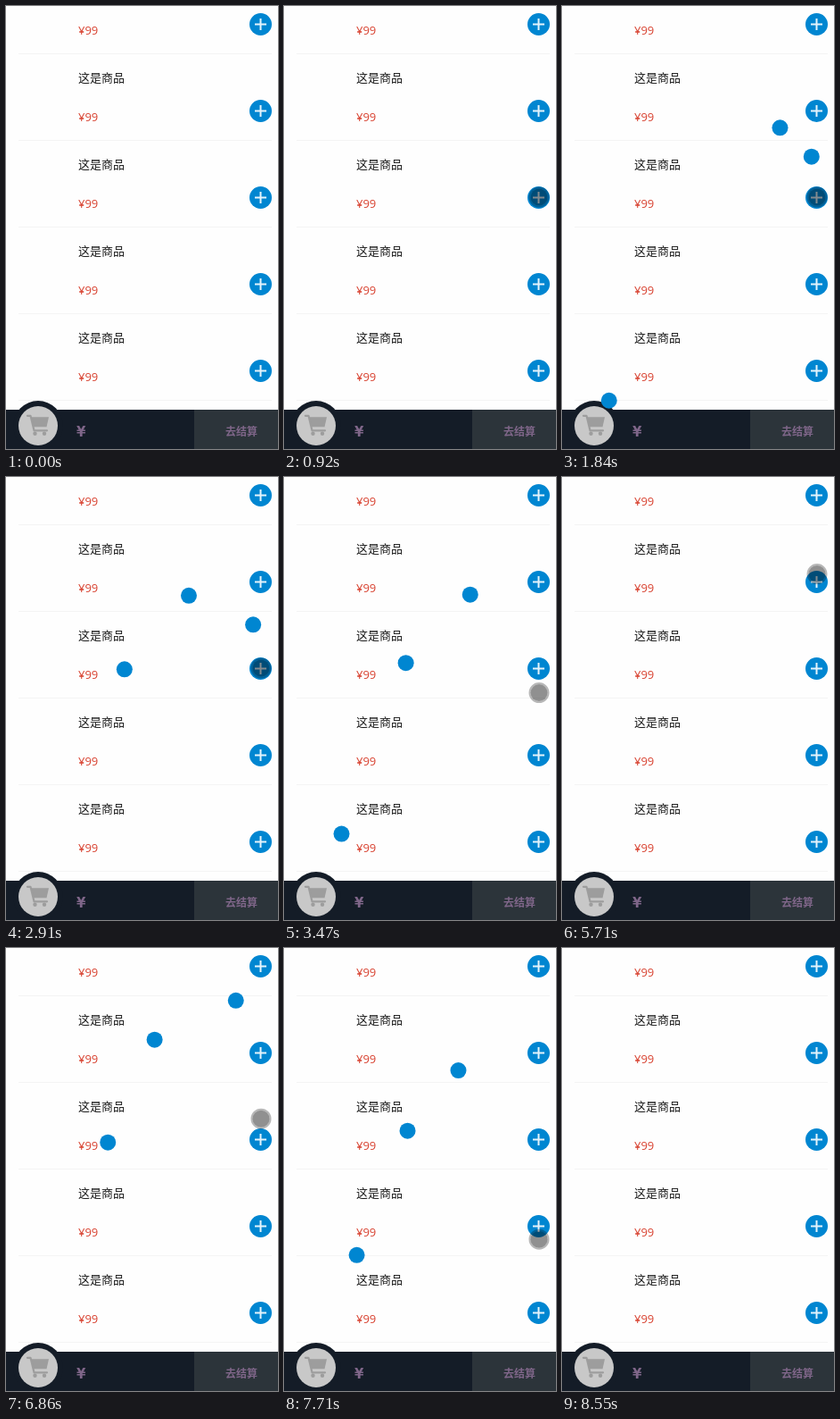
Animation, 305 px wide and 496 px high, one loop 8630 ms. Source, as an HTML page:

```html
<!DOCTYPE html>
<html lang="zh">
<head>
<meta charset="utf-8">
<title>购物车</title>
<style>
  html, body { margin: 0; width: 100%; height: 100%; overflow: hidden; background: #fefefe; }
  svg { display: block; width: 305px; height: 496px; }
  text { font-family: "Open Sans", "Noto Sans CJK SC", "Noto Sans CJK", sans-serif; }
  .name { font-size: 13px; fill: #1c1c1c; }
  .price { font-size: 13px; fill: #d8412f; }
  .bar { font-weight: 700; fill: #7f6689; }
  .sum { font: 700 15px "DejaVu Sans", sans-serif; }
</style>
</head>
<body>
<svg viewBox="0 0 305 496">
  <g id="list"></g>
  <rect y="452" width="305" height="44" fill="#141c27"/>
  <rect x="211" y="452" width="94" height="44" fill="#2c343a"/>
  <text class="bar sum" x="79" y="482">¥</text>
  <text class="bar" x="246" y="481" font-size="12">去结算</text>
  <circle cx="36" cy="470" r="28" fill="#141c27"/>
  <circle cx="36" cy="470" r="22" fill="#c8c8c8"/>
  <g fill="#9d9d9d" transform="translate(0 -.7)">
    <path d="M28 461H48L45.5 472H30.5Z"/>
    <path d="M24 459.5H27.5L31.5 476H46" fill="none" stroke="#9d9d9d" stroke-width="2.2" stroke-linecap="round" stroke-linejoin="round"/>
    <circle cx="32.5" cy="479.5" r="2.2"/>
    <circle cx="43" cy="479.5" r="2.2"/>
  </g>
  <g id="balls" fill="#0086d1"></g>
  <g id="touch">
    <circle r="9.5" fill="#000" fill-opacity=".43"/>
    <circle r="10.5" fill="none" stroke="#000" stroke-opacity=".28" stroke-width="2"/>
  </g>
</svg>
<script>
  const LOOP = 8630, FLIGHT = 640;
  const START_X = 287, END = { x: 44, y: 475 };
  const $ = id => document.getElementById(id);

  for (let i = 0; i < 5; i++) {
    const name = i < 4 ? '<text class="name" x="81" y="85">这是商品</text>' : '';
    $('list').innerHTML += `<g transform="translate(0 ${97 * i})">
      <text class="price" x="81" y="32">¥99</text>${name}
      <path d="M14 53.5H298" stroke="#f4f4f4"/>
      <circle cx="285.5" cy="20.5" r="12.5" fill="#0086d1"/>
      <path d="M279 20.5h13m-6.5 -6.5v13" stroke="#e4f3fc" stroke-width="2"/>
    </g>`;
  }

  // Each tapped row has its own apex; every ball lands in the cart
  const low = { x: 220.7, y: 130.1 }, high = { x: 232.3, y: 51.1 };

  function addBurst(apex, first, gap, count) {
    return Array.from({ length: count }, (_, i) => {
      const el = document.createElementNS('http://www.w3.org/2000/svg', 'circle');
      el.setAttribute('r', 9);
      $('balls').append(el);
      return { el, apex, start: first + gap * i };
    });
  }

  const balls = [
    addBurst(low, 1224, 0, 1),
    addBurst(low, 1729, 93, 6),
    addBurst(low, 2505, 190, 5),
    addBurst(high, 6406, 138, 2),
    addBurst(high, 6784, 0, 1),
    addBurst(low, 7020, 150, 4)
  ].flat();

  // Pointer rests: arrival, departure, height
  const rests = [
    [70, 70, 467], [610, 3420, 214], [4080, 4080, 442], [5160, 5710, 108],
    [5870, 6020, 162], [6250, 6790, 128], [6925, 7560, 214], [8170, 8170, 510]
  ];

  function pointer(t) {
    const i = rests.findIndex(r => r[0] > t);
    if (i < 1) return null;
    const [, leave, y0] = rests[i - 1], [arrive, , y1] = rests[i];
    const p = Math.max(0, (t - leave) / (arrive - leave));
    const entry = i === 1 ? 1 - p : 0;
    return [286 - 49 * entry, y0 + (y1 - y0) * Math.sin(p * Math.PI / 2)];
  }

  function fly({ el, apex, start }, t) {
    const p = (t - start) / FLIGHT;
    const on = p >= 0 && p < 1;
    el.style.display = on ? '' : 'none';
    if (!on) return;
    const x = START_X + (END.x - START_X) * p;
    const reach = (x - apex.x) / (END.x - apex.x);
    el.setAttribute('cx', x);
    el.setAttribute('cy', apex.y + (END.y - apex.y) * reach ** 2);
  }

  function draw(t) {
    balls.forEach(ball => fly(ball, t));
    const pos = pointer(t);
    $('touch').style.display = pos ? '' : 'none';
    if (pos) $('touch').setAttribute('transform', `translate(${pos})`);
  }

  const begin = performance.now();
  function tick() {
    draw((performance.now() - begin) % LOOP);
    requestAnimationFrame(tick);
  }
  tick();
</script>
</body>
</html>
```
